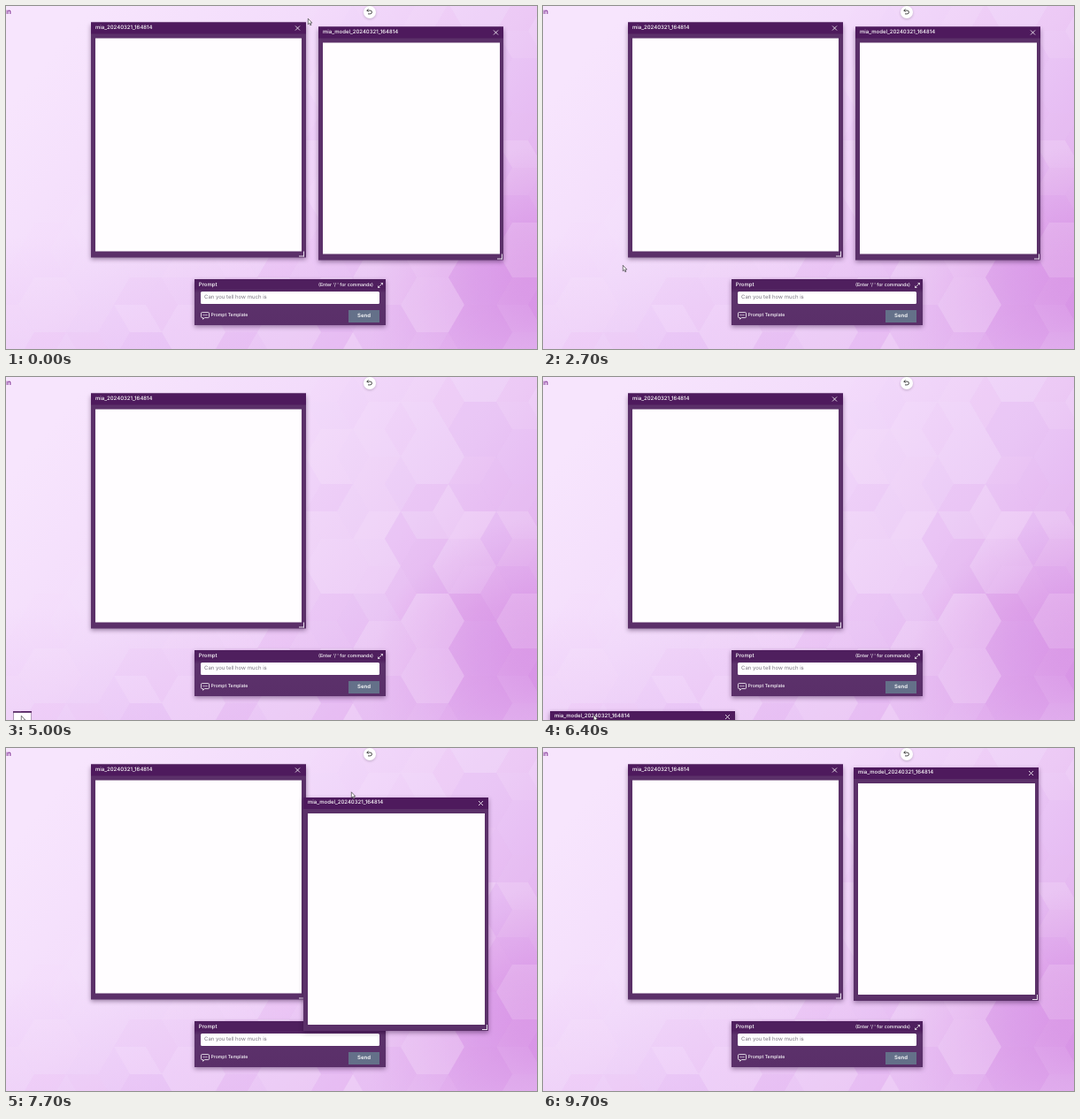
Animation of 600 by 388 pixels, one loop 9800 ms. Source, as an HTML page with a canvas:

```html
<!DOCTYPE html>
<html lang="en">
<head>
<meta charset="utf-8">
<title>Floating prompt windows</title>
<style>
html, body { margin: 0; width: 100%; height: 100%; overflow: hidden; }
body { position: relative; background: #f4e0fb; font: 500 6px/1 Inter, sans-serif; color: #fff; text-rendering: geometricPrecision; }
body * { position: absolute; box-sizing: border-box; white-space: nowrap; }
svg { overflow: visible; fill: none; stroke: #fff; }
#stage { left: 0; top: 0; width: 600px; height: 388px; overflow: hidden; }
#bg { left: 0; top: 0; }
.brand { left: -4px; top: 2px; font-size: 8px; font-weight: 600; color: #7b2b90; }
.undo { left: 403.5px; top: -.5px; width: 14px; height: 14px; border-radius: 50%; background: #fff; box-shadow: 0 1px 3px #0003; }
.win { left: 0; top: 0; background: #5b3069; transform-origin: 0 0; box-shadow: 0 2px 5px #2a0a3570; }
.bar { left: 0; right: 0; top: 0; height: 12.5px; background: #4e1a5d; }
.bar span { left: 5px; top: 3px; }
.page { left: 4.7px; right: 4.5px; top: 18px; bottom: 7px; background: #fffdff; }
.close { right: 6.5px; top: 4px; width: 5px; height: 5px; }
.grip { right: 1.5px; bottom: 1px; width: 6px; height: 6px; border: solid #e9dfee; border-width: 0 1px 1px 0; }
#one { width: 242.5px; height: 265.5px; }
#two { width: 209px; height: 263.5px; }
#prompt { left: 212.5px; top: 309px; width: 216.5px; height: 52px; background: linear-gradient(#4f1f5e 20%, #5c326b 30%, #5a2f69); box-shadow: 0 2px 5px #2a0a3570; }
.field { left: 7px; top: 14px; width: 202.5px; height: 14px; border-radius: 1.5px; background: #fff; color: #7a7480; font-weight: 400; }
.field span { left: 4.5px; top: 4.4px; }
#caret { left: 75.5px; top: 3.5px; width: .7px; height: 7px; background: #333; }
.send { left: 174.5px; top: 35px; width: 35px; height: 13.5px; background: #647089; font-weight: 600; line-height: 13.5px; text-align: center; }
#cursor { left: 0; top: 0; width: 6px; height: 9px; }
</style>
</head>
<body>
<div id="stage">
  <canvas id="bg" width="600" height="388"></canvas>
  <div class="brand">un</div>
  <div class="undo">
    <svg style="left:3.5px;top:3.5px" width="7" height="7" viewBox="0 0 7 7"><path d="M2.4.5.8 2.1 2.4 3.7M.8 2.1H4.5a1.9 1.9 0 0 1 0 3.8H2" stroke="#333" stroke-width=".9"/></svg>
  </div>
  <div id="prompt">
    <span style="left:5.3px;top:4.3px">Prompt</span>
    <span style="right:14px;top:4.5px;font-size:5.2px">(Enter '/ ' for commands)</span>
    <svg style="left:207px;top:4px" width="6" height="6" viewBox="0 0 6 6"><path d="M.5 5.5 5.5.5M3.5.5h2v2M.5 3.5v2h2" stroke-width=".7"/></svg>
    <div class="field"><span>Can you tell how much is</span><i id="caret"></i></div>
    <svg style="left:7.5px;top:37px" width="10" height="9" viewBox="0 0 10 9"><path d="M1.5.6h7q1 0 1 1v4q0 1-1 1H4.4L2.6 8.3V6.6H1.5q-1 0-1-1v-4q0-1 1-1z" stroke-width=".8"/><path d="M2.6 3.6h1M4.5 3.6h1M6.4 3.6h1"/></svg>
    <span style="left:19px;top:39.3px;font-size:5.15px">Prompt Template</span>
    <div class="send">Send</div>
  </div>
  <div id="one" class="win">
    <div class="bar"><span>mia_20240321_164814</span><svg class="close" viewBox="0 0 5 5"><path d="M0 0 5 5M5 0 0 5" stroke-width=".8"/></svg></div>
    <div class="page"></div><i class="grip"></i>
  </div>
  <div id="two" class="win">
    <div class="bar"><span>mia_model_20240321_164814</span><svg class="close" viewBox="0 0 5 5"><path d="M0 0 5 5M5 0 0 5" stroke-width=".8"/></svg></div>
    <div class="page"></div><i class="grip"></i>
  </div>
  <svg id="cursor" viewBox="0 0 6 9"><path d="M.3.3v6.5l1.5-1.3 1.1 2.4 1-.5-1.1-2.3h2z" fill="#fff" stroke="#222" stroke-width=".6"/></svg>
</div>
<script>
const $ = id => document.getElementById(id);
const LOOP = 9800, STEP = 100;

function drawBackground() {
  const g = $('bg').getContext('2d'), side = 36, half = 31;
  const shade = (grad, ...colors) => {
    colors.forEach((c, i) => grad.addColorStop(i / (colors.length - 1), c));
    g.fillStyle = grad;
    g.fillRect(0, 0, 600, 388);
  };
  shade(g.createLinearGradient(80, 20, 520, 388), '#f7e5fd', '#f3dcfb', '#ecccf6', '#e3b2ee');
  shade(g.createRadialGradient(600, 350, 0, 600, 350, 190), 'rgba(200,105,215,.55)', 'rgba(200,105,215,0)');
  shade(g.createLinearGradient(0, 260, 0, 388), 'rgba(232,195,245,0)', 'rgba(232,195,245,.45)');

  let seed = 29;
  const rnd = () => (seed = seed * 16807 % 2147483647) / 2147483647;
  const poly = (pts, v) => {
    g.fillStyle = v > 0 ? `rgba(255,243,255,${v})` : `rgba(200,105,220,${-v * .6})`;
    g.beginPath();
    pts.forEach(p => g.lineTo(...p));
    g.fill();
  };

  // flat-topped hexagons, stronger to the lower right, some split into cube faces
  for (let col = -10; col < 3; col++) {
    for (let row = -4; row < 4; row++) {
      const x = 536 + col * side * 1.5, y = 245 + row * 2 * half + (col & 1) * half;
      const v = [...Array(6).keys()].map(i => {
        const a = i * Math.PI / 3;
        return [x + side * Math.cos(a), y + half / Math.sin(Math.PI / 3) * Math.sin(a)];
      });
      const depth = Math.max(0, Math.min(1, (x * .8 + y * .9 - 250) / 480)) * .36;
      const tone = () => (rnd() * 1.4 - .7) * depth;
      if (rnd() < .4) poly(v, tone());
      else for (let i = 1; i < 6; i += 2) poly([[x, y], v[i], v[(i + 1) % 6], v[(i + 2) % 6]], tone());
    }
  }
  poly([[230, 214], [248, 245], [230, 276], [212, 245]], .55);
}

const clamp = p => Math.max(0, Math.min(1, p));
const ease = p => p * p * (3 - 2 * p);
const mix = (a, b, p) => a.map((v, i) => v + (b[i] - v) * p);

// each move is [start, end, goal] and leaves from wherever the last one ended
const travel = (home, moves, t) =>
  moves.reduce((pos, [a, b, goal]) => mix(pos, goal, ease(clamp((t - a) / (b - a)))), home);

const homeOne = [96, 18.5, 1], homeTwo = [353, 23.5, 1];
const dockOne = [14, 379, .1], dockTwo = [8, 378, .1], openTwo = [8, 378, 1];
const DRAG = 6400, DROP = 8600;

const movesOne = [[850, 1600, dockOne], [2150, 2600, homeOne]];
const movesTwo = [
  [4150, 4750, dockTwo], [5250, 5800, openTwo],
  [DRAG, 7000, [32, 303, 1]], [7000, 7700, [336, 56, 1]], [7700, DROP, [351, 22, 1]]
];
const movesCursor = [
  [0, 400, [331, 24]], [850, 1800, [27, 380]], [2150, 2700, [90, 293]],
  [2700, 3900, [554, 30]], [4200, 4900, [17, 383]], [5200, 5600, [57, 382]]
];

const place = (id, [x, y, s = 1]) => { $(id).style.transform = `translate(${x}px,${y}px) scale(${s})`; };
const show = (el, on) => { el.style.visibility = on ? 'visible' : 'hidden'; };
const within = (t, a, b) => t >= a && t < b;
const closers = document.querySelectorAll('.close');

function render(t) {
  const two = travel(homeTwo, movesTwo, t);
  place('one', travel(homeOne, movesOne, t));
  place('two', two);
  // while dragging, the pointer gradually leads the window
  const lead = mix([49, 4], [54, -6.5], clamp((t - DRAG) / 1300));
  place('cursor', t < DRAG ? travel([341, 14], movesCursor, t) : [two[0] + lead[0], two[1] + lead[1]]);

  const docked = within(t, 850, 2600) || within(t, 4150, 5800);
  closers.forEach(el => show(el, !docked));
  show($('caret'), within(t, 1600, 2100));
  show($('cursor'), t < DROP);
}

drawBackground();
const start = performance.now();
function tick() {
  const t = (performance.now() - start) % LOOP;
  render(Math.floor(t / STEP) * STEP);
  requestAnimationFrame(tick);
}
tick();
</script>
</body>
</html>
```
